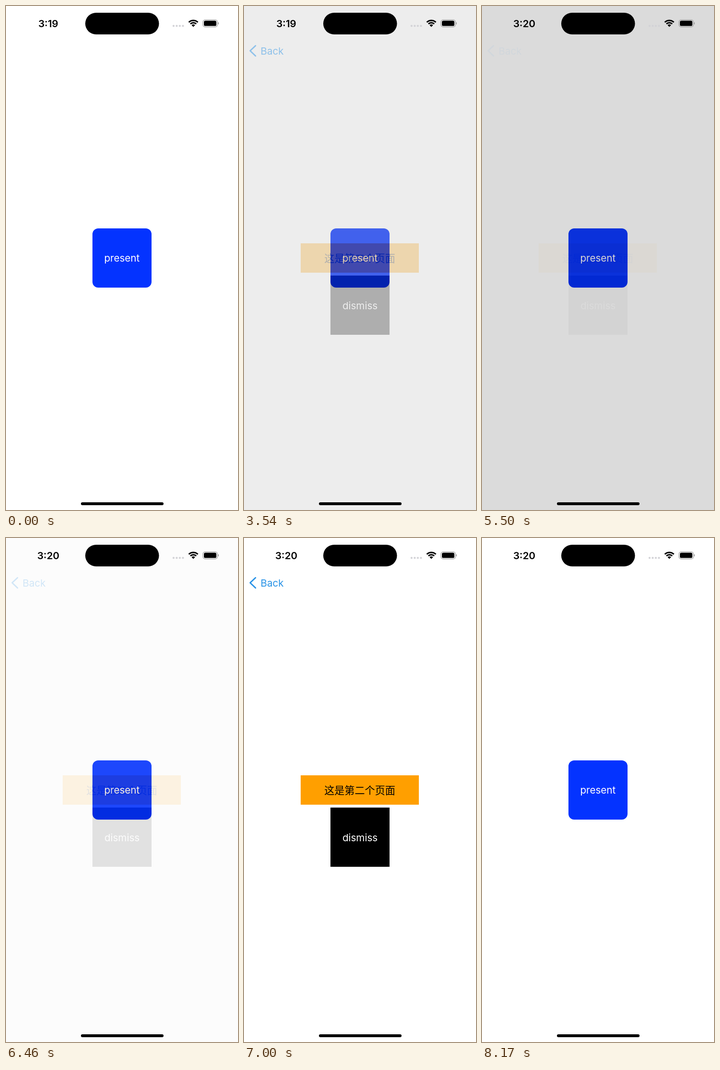
An HTML page with a canvas that plays this animation: 483 px wide and 1047 px high, repeating every 8.21 s.

```html
<!DOCTYPE html>
<html lang="en">
<head>
<meta charset="utf-8">
<title>Page fade</title>
<style>
  html, body { margin: 0; width: 100%; height: 100%; overflow: hidden; background: #000; }
  canvas { display: block; }
</style>
</head>
<body>
<canvas id="stage" width="483" height="1047"></canvas>
<script>
const W = 483, H = 1047, LOOP = 8210;
const LATIN = 'Inter, "Liberation Sans", sans-serif';
const CJK = '"Noto Sans CJK SC", "Noto Sans CJK", sans-serif';
const BLUE = '#0433ff', ORANGE = '#ff9f00', LINK = '#2a93e6';

const ctx = document.getElementById('stage').getContext('2d');

function box(c, x, y, w, h, r, color) {
  c.fillStyle = color;
  c.beginPath();
  c.roundRect(x, y, w, h, r);
  c.fill();
}

function text(c, str, x, y, color, font, align = 'center') {
  c.fillStyle = color;
  c.font = font;
  c.textAlign = align;
  c.fillText(str, x, y);
}

function makePage(draw) {
  const page = document.createElement('canvas');
  page.width = W;
  page.height = H;
  const c = page.getContext('2d');
  c.fillStyle = '#fff';
  c.fillRect(0, 0, W, H);
  draw(c);
  return page;
}

const firstPage = makePage(c => {
  box(c, 180, 462, 123, 123, 12, BLUE);
  text(c, 'present', 241.3, 531, '#fff', `20.6px ${LATIN}`);
});

const secondPage = makePage(c => {
  box(c, 118, 493, 246, 61, 0, ORANGE);
  text(c, '这是第二个页面', 241, 531.5, '#000', `21.1px ${CJK}`);
  box(c, 180, 560, 123, 123, 0, '#000');
  text(c, 'dismiss', 241.5, 629.5, '#fff', `20.6px ${LATIN}`);
});

function backButton() {
  ctx.strokeStyle = LINK;
  ctx.lineWidth = 2.8;
  ctx.lineCap = ctx.lineJoin = 'round';
  ctx.beginPath();
  ctx.moveTo(24, 82.5);
  ctx.lineTo(12.8, 93);
  ctx.lineTo(24, 103.8);
  ctx.stroke();
  text(ctx, 'Back', 34.5, 100.5, LINK, `20.6px ${LATIN}`, 'left');
}

function wifi() {
  const x = 390, y = 43.5, half = Math.PI * 0.245;
  ctx.strokeStyle = ctx.fillStyle = '#000';
  ctx.lineWidth = 3;
  ctx.lineCap = 'butt';
  for (const r of [13.6, 8.7]) {
    ctx.beginPath();
    ctx.arc(x, y, r, -Math.PI / 2 - half, -Math.PI / 2 + half);
    ctx.stroke();
  }
  ctx.beginPath();
  ctx.moveTo(x, y);
  ctx.arc(x, y, 5.2, -Math.PI / 2 - half, -Math.PI / 2 + half);
  ctx.fill();
}

function battery() {
  ctx.strokeStyle = '#a2a2a2';
  ctx.lineWidth = 1.2;
  ctx.beginPath();
  ctx.roundRect(409.8, 28.6, 30.6, 15, 5);
  ctx.stroke();
  box(ctx, 412, 30.6, 26, 11, 3.2, '#000');
  box(ctx, 441.3, 33.5, 1.7, 5, [0, 2, 2, 0], '#a2a2a2');
}

function statusBar(t) {
  text(ctx, t < 3800 ? '3:19' : '3:20', 88, 43.5, '#000', `600 20.6px ${LATIN}`);
  box(ctx, 165, 14, 153.5, 45, 22.5, '#000');
  for (let i = 0; i < 4; i++) box(ctx, 346.8 + i * 6.5, 39.2, 4.2, 4.2, 2.1, '#d2d2d6');
  wifi();
  battery();
  box(ctx, 156, 1031, 172, 6, 3, '#000');
}

function ramp(t, start, len) {
  const u = Math.min(1, Math.max(0, (t - start) / len));
  return u * u * (3 - 2 * u);
}

// Opacity of the second page.
const shown = t => ramp(t, 3335, 640) - ramp(t, 5050, 500)
                 + ramp(t, 6334, 640) - ramp(t, 7510, 500);

// How far the first page has faded towards black; trails the second page.
const faded = t => ramp(t, 3423, 640) - ramp(t, 5075, 560)
                 + ramp(t, 6422, 640) - ramp(t, 7540, 560);

function layer(alpha, draw) {
  ctx.globalAlpha = Math.min(1, Math.max(0, alpha));
  draw();
  ctx.globalAlpha = 1;
}

function render(t) {
  const started = t >= 3500;
  const top = started ? shown(t) : 0;
  const dim = started ? faded(t) : 0;
  ctx.fillStyle = '#000';
  ctx.fillRect(0, 0, W, H);
  layer(1 - dim, () => ctx.drawImage(firstPage, 0, 0));
  layer(top, () => ctx.drawImage(secondPage, 0, 0));
  layer(top * 2, backButton);
  statusBar(t);
}

const origin = performance.now();
function tick() {
  render((performance.now() - origin) % LOOP);
  requestAnimationFrame(tick);
}
tick();
</script>
</body>
</html>
```
